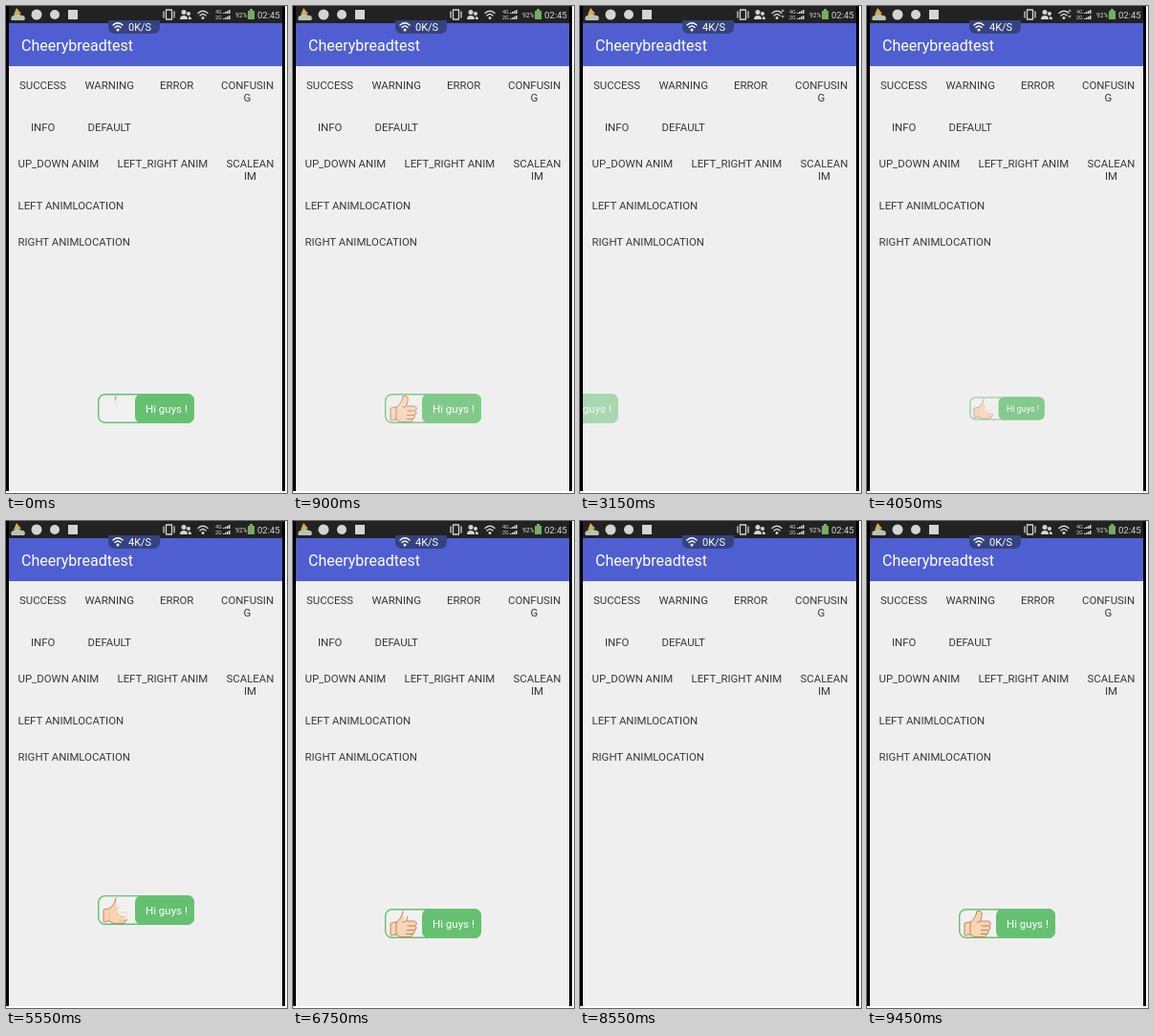
Animation, 294 px wide and 510 px high, one loop 9600 ms. Source, as an HTML page:

```html
<!DOCTYPE html>
<html lang="en">
<head>
<meta charset="utf-8">
<title>Toast demo</title>
<style>
  html, body { margin: 0; width: 100%; height: 100%; overflow: hidden; background: #fff; }
  svg { display: block; font: 11.4px Roboto, sans-serif; }
  .mid { text-anchor: middle; }
  .line { fill: none; stroke-linecap: round; stroke-linejoin: round; }
</style>
</head>
<body>
<svg width="294" height="510" viewBox="0 0 294 510">
  <defs>
    <clipPath id="screen"><rect x="3" y="18" width="286" height="490"/></clipPath>
    <g id="wifi" class="line" stroke-width="1.4">
      <path d="M-5-2Q0-6.5 5-2M-3 .5Q0-2.5 3 .5"/>
      <circle cy="3" r=".8"/>
    </g>
  </defs>
  <rect width="292" height="508"/>
  <rect x="3" width="286" height="18" fill="#222"/>
  <rect x="3" y="18" width="286" height="490" fill="#efefef"/>
  <rect x="3" y="18" width="286" height="45" fill="#4f5fd2"/>
  <text x="16" y="47" font-size="16" fill="#fff">Cheerybreadtest</text>

  <g id="status" fill="#d4d4d4">
    <path d="M8 9l3-7l5 6z" fill="#e0a848"/>
    <path d="M6 15a3 3 0 0 1 2-5a5 5 0 0 1 8 0a3 3 0 0 1 3 5z" fill="#b9c3b4"/>
    <circle cx="32" cy="9" r="5.5"/>
    <circle cx="51" cy="9" r="5"/>
    <rect x="65" y="4" width="10" height="10"/>
    <g class="line" stroke="#d4d4d4" stroke-width="1.3">
      <rect x="167.5" y="4" width="6" height="10"/>
      <path d="M165 6v6M176 6v6"/>
    </g>
    <circle cx="186" cy="6.500" r="2.5"/>
    <path d="M182 14q0-4 4-4t4 4z"/>
    <circle cx="191" cy="8" r="2"/>
    <path d="M191 14v-3q3 0 3 3z"/>
    <use href="#wifi" x="206" y="9.5" stroke="#d4d4d4"/>
    <path id="sync" d="M210 6l2-3 2 3zM210 10l2 3 2-3z" fill="#63bf58"/>
    <text x="219" y="8" font-size="5.5">4G</text>
    <text x="219" y="14" font-size="5.5">2G</text>
    <path d="M227 8v-1h1.5v1zM229 8v-2h1.5v2zM231 8v-3h1.5v3zM233 8v-4h1.5v4zM227 14v-1h1.5v1zM229 14v-2h1.5v2zM231 14v-3h1.5v3zM233 14v-4h1.5v4z"/>
    <text x="240" y="12" font-size="6.7">92%</text>
    <path d="M253 5h2v-2h3v2h2v9h-7z" fill="#76ad60"/>
    <text x="263" y="12.5" font-size="9.5">02:45</text>
  </g>
  <path d="M107 15h54v7q0 7-7 7h-40q-7 0-7-7z" fill="#34437f"/>
  <use href="#wifi" x="117" y="22" stroke="#fff"/>
  <text id="speed" x="128" y="26" font-size="11" fill="#fff"></text>

  <g fill="#383838">
    <text x="14" y="87">SUCCESS</text>
    <text x="82.5" y="87">WARNING</text>
    <text x="161" y="87">ERROR</text>
    <text x="252.5" y="87" class="mid">CONFUSIN</text>
    <text x="252.5" y="100" class="mid">G</text>
    <text x="26" y="131">INFO</text>
    <text x="85.5" y="131">DEFAULT</text>
    <text x="12.5" y="169">UP_DOWN ANIM</text>
    <text x="116.5" y="169">LEFT_RIGHT ANIM</text>
    <text x="255.5" y="169" class="mid">SCALEAN</text>
    <text x="255.5" y="182" class="mid">IM</text>
    <text x="12.5" y="213">LEFT ANIMLOCATION</text>
    <text x="12.5" y="251">RIGHT ANIMLOCATION</text>
  </g>

  <g clip-path="url(#screen)">
    <g id="toast">
      <rect x="96.7" y="406.7" width="99.6" height="29.6" rx="7" fill="#f1f1f1" stroke="#66c071" stroke-width="1.4"/>
      <rect x="135" y="406" width="62" height="31" rx="7" fill="#66c071"/>
      <text x="146" y="426" font-size="11.5" fill="#fff">Hi guys !</text>
      <polygon id="hand" fill="#f8d5b4"/>
      <polyline id="outline" class="line" stroke="#bd7650"/>
      <path id="details" class="line" stroke="#bd7650" stroke-width=".9"
        d="M127 424h-7M126.5 428.5h-7M125 432.5h-6M108 420v13M115 420q3 1 3.5-1"/>
    </g>
  </g>
  <circle id="touch" r="9.3" fill="#fff" fill-opacity=".3" stroke="#a9c3e2"/>
</svg>
<script>
const LOOP = 9600, STEP = 150, DRAW = 500, LEAVE = 250, CX = 146.5, CY = 421.5;
const PALM = "117,424";
const $ = id => document.getElementById(id);
const clamp = v => Math.max(0, Math.min(1, v));

// kind, start, leave (ms)
const toasts = [
  ["fade", -10, 850], ["slide", 1490, 1900], ["bounce", 2150, 2750],
  ["slide", 3000, 3500], ["scale", 3740, 4400], ["bounce", 5250, 6000],
  ["slide", 6300, 6950], ["scale", 7520, 8250], ["fade", 8940, 9600]
];
// time, x, y
const taps = [
  [1800, 65, 167], [2850, 163, 166], [3600, 255, 172], [5100, 63, 167],
  [6150, 163, 166], [7350, 255, 172], [8700, 38, 83]
];

// each returns [dx, dy, scale, alpha]; a = age, q = leaving progress
const moves = {
  fade: (a, q) => [0, 0, 1, 1 - q],
  slide: (a, q) => {
    const e = clamp(a / 300);
    return [314 * (e - 1 + q), 0, 1, e * (1 - q)];
  },
  bounce: (a, q) => {
    const swing = 18.2 * Math.exp(-a / 1175) * Math.sin(a * Math.PI / 200);
    return [0, swing * (1 - q) + 75 * q, 1, clamp((a + 75) / 150) * (1 - q)];
  },
  scale: (a, q) => {
    const e = clamp(a / 400) * (1 - q);
    return [0, 0, e, e];
  }
};

// outline of the thumb, from its tip down past the cuff and up the fingers
const thumb = document.createElementNS("http://www.w3.org/2000/svg", "path");
thumb.setAttribute("d", `M115 409C114 413 112 418 108 420L102 421V434L108 433L112 435.5H121
  C123 435.5 125 435 125 432.5C127 432.5 128 430 126.5 428.5C129 428.5 130 425 127.5 424
  C130 423 130 419 126 419H118.5L120 414C121 410 119 407 115 409`);
const length = thumb.getTotalLength();
const points = Array.from({ length: 101 }, (_, i) => {
  const { x, y } = thumb.getPointAtLength(length * i / 100);
  return x.toFixed(2) + "," + y.toFixed(2);
});

function drawThumb(p) {
  const traced = points.slice(0, 2 + Math.round(p * 99)).join(" ");
  $("hand").setAttribute("points", traced + " " + PALM);
  $("outline").setAttribute("points", traced);
  $("details").setAttribute("opacity", clamp((p - 0.5) / 0.4));
}

function draw(t) {
  const toast = toasts.find(([, start, leave]) => t >= start && t < leave + LEAVE);
  $("toast").setAttribute("opacity", 0);
  if (toast) {
    const [kind, start, leave] = toast, age = t - start;
    const [dx, dy, s, alpha] = moves[kind](age, clamp((t - leave) / LEAVE));
    $("toast").setAttribute("opacity", alpha);
    $("toast").setAttribute("transform",
      `translate(${CX + dx} ${CY + dy}) scale(${s}) translate(${-CX} ${-CY})`);
    drawThumb(clamp(age / DRAW));
  }

  const tap = taps.find(([at]) => at === t);
  $("touch").setAttribute("opacity", tap ? 1 : 0);
  if (tap) $("touch").setAttribute("transform", `translate(${tap[1]} ${tap[2]})`);

  $("speed").textContent = t >= 2400 && t < 7200 ? "4K/S" : "0K/S";
  $("sync").setAttribute("opacity", t >= 1500 && t < 5100 ? 1 : 0);
}

const begin = performance.now();
function tick() {
  const t = (performance.now() - begin) % LOOP;
  draw(Math.floor(t / STEP) * STEP);
  requestAnimationFrame(tick);
}
tick();
</script>
</body>
</html>
```
